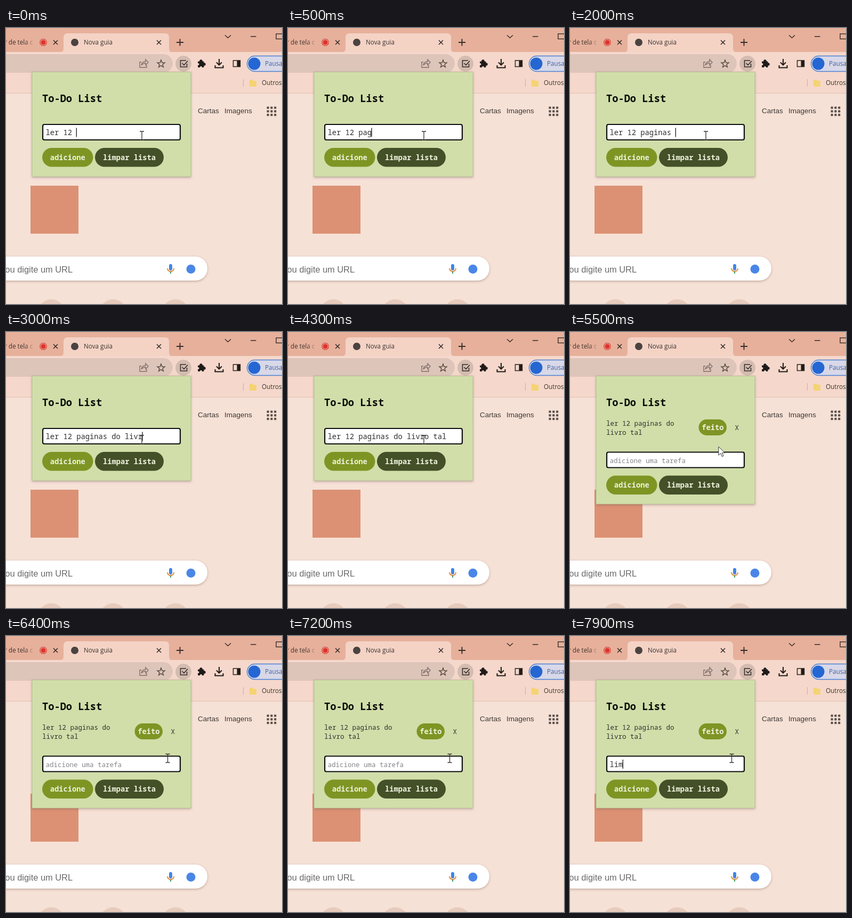
An HTML page that plays this animation: 518 px wide and 518 px high, repeating every 8 s.

```html
<!DOCTYPE html>
<html lang="pt-BR">
<head>
<meta charset="utf-8">
<title>To-Do List</title>
<style>
html, body { margin: 0; width: 100%; height: 100%; overflow: hidden; background: #f6e1d6; }
svg { display: block; width: 100vw; height: 100vh; }
text { white-space: pre; }
.ui { font: 11.7px "Open Sans", "Noto Sans", sans-serif; fill: #3d3430; }
.web { font: 13.5px "Liberation Sans", Arial, sans-serif; fill: #3d3835; }
.mono { font: 13.75px "Noto Sans Mono", "DejaVu Sans Mono", monospace; fill: #303030; }
.small { font-size: 12.5px; }
.title { font-size: 18.7px; font-weight: 700; fill: #080a05; }
.pill { font-weight: 600; fill: #eff2dc; text-anchor: middle; }
.line { fill: none; stroke: #352d2a; stroke-width: 1.6; }
.soft { stroke: #80706a; stroke-width: 1.4; }
</style>
</head>
<body>
<svg viewBox="0 0 518 518">
  <defs>
    <filter id="drop" x="-10%" y="-20%" width="120%" height="150%">
      <feDropShadow dx="0" dy="1.5" stdDeviation="2" flood-color="#6b4a3c" flood-opacity=".4"/>
    </filter>
    <linearGradient id="fade">
      <stop offset="0" stop-color="#e7b09b" stop-opacity="0"/>
      <stop offset="1" stop-color="#e7b09b"/>
    </linearGradient>
  </defs>

  <!-- page -->
  <rect width="518" height="518" fill="#f6e1d6"/>
  <rect x="46" y="296" width="90" height="90" fill="#dc9174"/>
  <text class="web" x="360" y="160">Cartas</text>
  <text class="web" x="410" y="160">Imagens</text>
  <g id="apps" fill="#5a504c"></g>
  <rect x="-60" y="429" width="438" height="45" rx="22.5" fill="#fff" filter="url(#drop)"/>
  <text class="web" x="125" y="458.500" text-anchor="end" style="font-size:16.4px;fill:#6a6a6c">ou digite um URL</text>
  <g fill="none" stroke-width="2">
    <path d="M303 451a6 6 0 0 0 12 0" stroke="#ee8a35"/>
    <path d="M309 457v4" stroke="#4a9d5b"/>
  </g>
  <rect x="306" y="443" width="6" height="12" rx="3" fill="#4285e8"/>
  <circle cx="347" cy="452.500" r="8.500" fill="#4a86e8"/>
  <g fill="#e7cbbd">
    <circle cx="85" cy="534" r="25"/><circle cx="201" cy="534" r="25"/><circle cx="318" cy="534" r="25"/>
  </g>

  <!-- tabs -->
  <rect width="518" height="46" fill="#e7b09b"/>
  <path d="M100 46q8 0 8-8V18q0-8 8-8h182q8 0 8 8v20q0 8 8 8z" fill="#f4d3c5"/>
  <text class="ui" x="-3" y="31">r de tela c</text>
  <rect x="36" y="16" width="18" height="22" fill="url(#fade)"/>
  <circle cx="70" cy="27" r="6.300" fill="none" stroke="#dc4a40" stroke-width="1.300"/>
  <circle cx="70" cy="27" r="4.600" fill="#dc352f"/>
  <circle cx="129" cy="27" r="7" fill="#4a4341"/>
  <text class="ui" x="146" y="31">Nova guia</text>
  <g class="line">
    <path d="M89 23l8 8m0-8l-8 8M283 23l8 8m0-8l-8 8"/>
    <path d="M320 27h13M326.500 20.500v13" stroke-width="1.900"/>
    <path d="M411 13.500l5.500 5 5.500-5M459 16h10.500" stroke-width="1.400"/>
    <rect x="507" y="11" width="14" height="9.500" stroke-width="1.400"/>
  </g>

  <!-- toolbar -->
  <rect y="45" width="518" height="77" fill="#f5d8cb"/>
  <path d="M0 122.500h518" stroke="#dfc2b5"/>
  <rect x="-40" y="49" width="353" height="35" rx="17.500" fill="#dec5ba"/>
  <g class="line soft">
    <path d="M254 64h-3v10h13v-4M254 70q1-7 8-7v-4l5 5.500-5 5.500v-4q-5 0-8 4z"/>
    <path id="star" stroke="#55483f"/>
  </g>
  <circle cx="333" cy="67" r="15" fill="#d4bcb0"/>
  <path class="line" d="M338 61h-10.500v12h12v-6M330.500 66l3.500 3.500 7-7.500"/>
  <g fill="#1f1b1a">
    <rect x="360" y="62.500" width="11.500" height="11.500" rx="1.500"/>
    <circle cx="366" cy="62" r="2.700"/><circle cx="372" cy="68" r="2.700"/>
  </g>
  <g fill="#f5d8cb"><circle cx="360.500" cy="68" r="2"/><circle cx="366" cy="73.800" r="2"/></g>
  <path class="line" stroke-width="2" style="stroke-width:2.1;stroke:#211c1a" d="M400 58v11M395 64.500l5 5 5-5M392.500 70v4.500h15V70"/>
  <rect class="line" x="426.500" y="61" width="13" height="11.500"/>
  <rect x="433.500" y="61" width="6" height="11.500" fill="#211c1a"/>
  <rect x="452.500" y="52.500" width="90" height="29" rx="14.500" fill="#d8d8e8" stroke="#4c7fd3" stroke-width="1.300"/>
  <circle cx="466" cy="67" r="11.500" fill="#2467d2"/>
  <text class="ui" x="486" y="71" style="fill:#44619b">Pausado</text>
  <path d="M445.500 96v14" stroke="#cdb0a3"/>
  <path d="M457 97h5l2 2h6v11h-13z" fill="#f5d373"/>
  <text class="ui" x="480" y="107">Outros</text>

  <!-- popup -->
  <rect id="panel" x="49" y="82.500" width="298" fill="#d1dea9" stroke="#adb58f" stroke-width=".7" filter="url(#drop)"/>
  <text class="mono title" x="68" y="139">To-Do List</text>
  <g id="item">
    <text class="mono small" x="68" y="175.500">ler 12 paginas do</text>
    <text class="mono small" x="68" y="192.500">livro tal</text>
    <rect x="241.500" y="164" width="52.500" height="30" rx="15" fill="#7e9524"/>
    <text class="mono pill" x="267.800" y="184">feito</text>
    <text class="mono small" x="309.500" y="184">X</text>
  </g>
  <g id="form">
    <rect x="69" y="181" width="258" height="29" rx="3" fill="#fff" stroke="#0c0f10" stroke-width="2.200"/>
    <text class="mono" id="entry" y="201"></text>
    <path id="caret" d="M0 187.500v17" stroke="#151515" stroke-width="1.300"/>
    <rect x="68" y="225" width="95.500" height="35.500" rx="17.700" fill="#7e9524"/>
    <text class="mono pill" x="115.700" y="247.500">adicione</text>
    <rect x="167" y="225" width="129" height="35.500" rx="17.700" fill="#435028"/>
    <text class="mono pill" x="231.500" y="247.500">limpar lista</text>
  </g>
  <g id="mouse">
    <path id="beam" class="line" stroke-width="1.300" style="stroke-width:1.3" d="M-4-7.500h3l1 1 1-1h3M0-6.500v14M-4 8.500h3l1-1 1 1h3"/>
    <path id="arrow" d="M0 0v16l3.800-3.600 2.700 6 2.700-1.200-2.700-5.700h5.200z" fill="#fff" stroke="#2b2b2b"/>
  </g>
</svg>
<script>
const $ = id => document.getElementById(id);
const LOOP = 8000, SUBMIT = 4500, CHAR = 8.25, BLINK = 550, LEFT = 74.5;
const phrase = "ler 12 paginas do livro tal", nextPhrase = "lim";
// Times of the keystrokes that follow "ler 12 ".
const keys = [200, 300, 500, 1000, 1200, 1300, 1500, 1800, 2200, 2300, 2400,
  2600, 2700, 2800, 3000, 3100, 3200, 3300, 3600, 3700];
const nextKeys = [7400, 7600, 7800];

for (let i = 0; i < 9; i++) {
  const dot = document.createElementNS("http://www.w3.org/2000/svg", "rect");
  const at = { x: 489.5 + i % 3 * 6.8, y: 147.5 + Math.floor(i / 3) * 6.8, width: 4.2, height: 4.2, rx: 1 };
  for (const name in at) dot.setAttribute(name, at[name]);
  $("apps").append(dot);
}
$("star").setAttribute("d", "M" + Array.from({ length: 10 }, (_, i) => {
  const angle = i * Math.PI / 5, r = i % 2 ? 3.1 : 7.4;
  return `${291 + r * Math.sin(angle)} ${67.5 - r * Math.cos(angle)}`;
}).join("L") + "z");

const show = (id, on) => $(id).setAttribute("visibility", on ? "visible" : "hidden");
const move = (id, x, y) => $(id).setAttribute("transform", `translate(${x} ${y})`);

function typed(t) {
  const added = t >= SUBMIT;
  const times = (added ? nextKeys : keys).filter(k => k <= t);
  const text = added ? nextPhrase.slice(0, times.length) : phrase.slice(0, 7 + times.length);
  return { text, since: t - (times.at(-1) ?? 0) };
}

function draw(t) {
  const added = t >= SUBMIT;
  const { text, since } = typed(t);
  $("panel").setAttribute("height", added ? 240.5 : 196.5);
  show("item", added);
  move("form", 0, added ? 44.5 : 0);

  const entry = $("entry");
  entry.textContent = text || "adicione uma tarefa";
  entry.setAttribute("x", LEFT);
  entry.style.fontSize = text ? "13.75px" : "12.5px";
  entry.style.fill = text ? "#303030" : "#85868a";
  move("caret", LEFT + text.length * CHAR, 0);
  show("caret", text && Math.floor(since / BLINK) % 2 === 0);

  const p = Math.min(1, Math.max(0, (t - 5100) / 800));
  const ease = p * p * (3 - 2 * p);
  const x = 254 + 49.5 * ease, y = 201.5 + 27.5 * ease;
  const overInput = !added || y > 225;
  move("mouse", x + (overInput && !added ? 1 : 0), y);
  show("beam", overInput);
  show("arrow", !overInput);
}

const start = performance.now();
(function tick() {
  draw((performance.now() - start) % LOOP);
  requestAnimationFrame(tick);
})();
</script>
</body>
</html>
```
